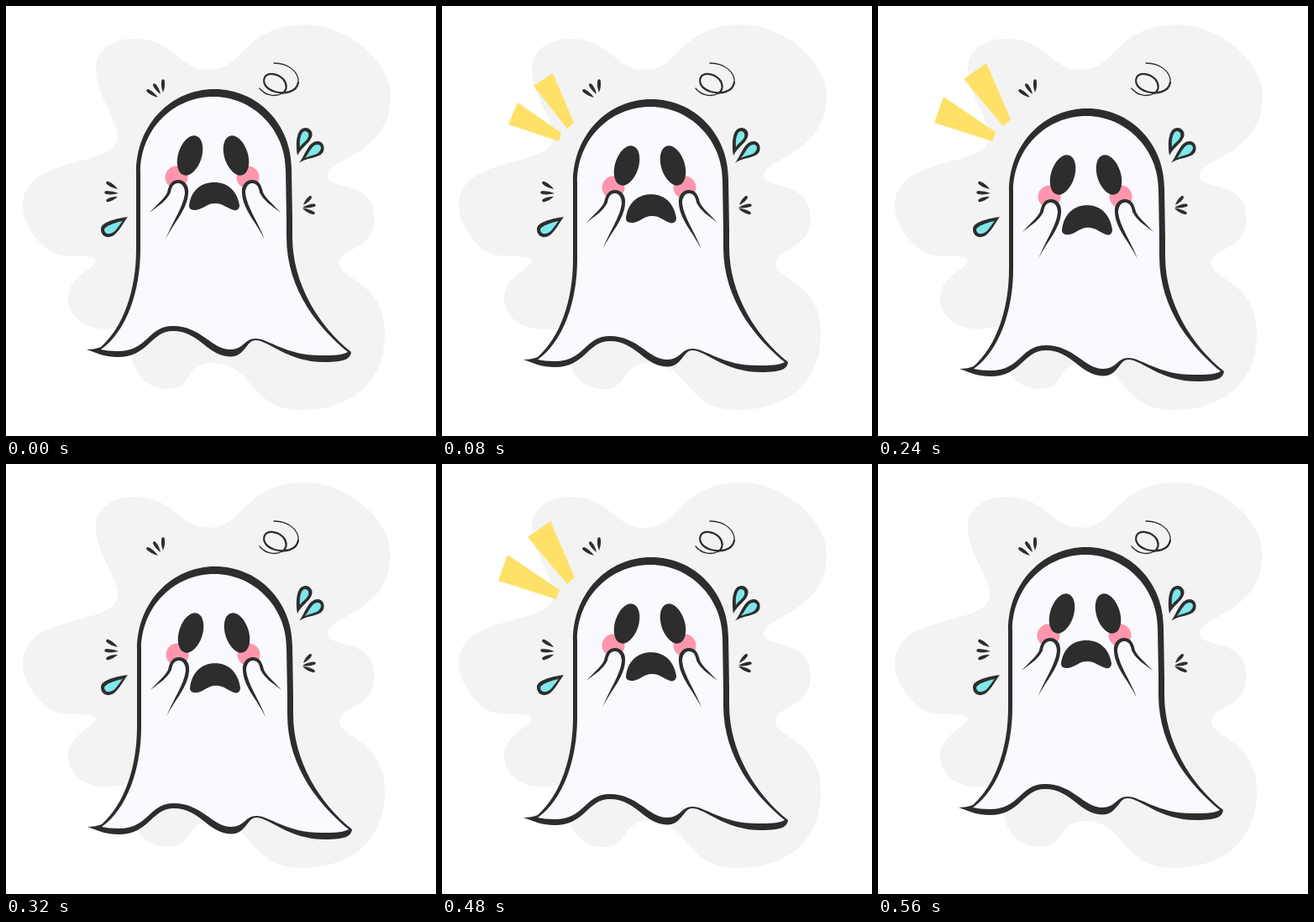
Write an HTML page with a canvas that moves like this. It is 512 px wide and 512 px high and loops after 640 ms.

```html
<!DOCTYPE html>
<html lang="en">
<head>
<meta charset="utf-8">
<title>Scared ghost</title>
<style>
html, body { margin: 0; width: 100%; height: 100%; overflow: hidden; background: #fff; }
canvas { display: block; width: 100vw; height: 100vh; }
</style>
</head>
<body>
<canvas id="stage" width="512" height="512"></canvas>
<script>
const ctx = document.getElementById('stage').getContext('2d');
const INK = '#2d2d2d', SHEET = '#f9faff', PINK = '#ff96ad', AQUA = '#7fe7ea', YELLOW = '#ffe168', GREY = '#f3f3f3';
const STEP = 80, LOOP = 640;

const blob = new Path2D(`M107 74 C107 52 128 39 153 39 C200 39 206 76 241 76
  C285 76 282 22 357 22 C401 22 458 62 458 108 C458 175 383 182 383 202
  C383 220 439 206 439 253 C439 290 397 288 397 307 C397 325 451 329 451 389
  C451 455 405 481 350 481 C290 481 295 425 246 425 C214 425 222 456 193 456
  C165 456 148 435 148 400 L150 380 L128 384 C95 388 74 370 74 347
  C74 322 107 312 107 303 C107 295 75 300 62 296 C44 292 20 262 20 238
  C20 175 133 195 133 155 C133 135 107 106 107 74Z`);

const outline = new Path2D(`M96 409 C103 409 108 408 113 406 C140 382 155 338 155 290
  V198 C155 141 197 99 248 99 C300 99 340 141 340 194 L341 255 V275 C341 330 372 381 411 412
  C410 420 404 424 379 424 C335 424 313 398 297 398 C286 398 285 417.5 267 417.5
  C240 417 230 387 199 387 C172 387 170 418 133 418 C118 418 110 414 96 409Z`);
const sheet = new Path2D(`M113 409 C143 388 160 340 160 290 V198 C160 147 199 108 247 108
  C294 108 333 147 333 196 L334 255 V275 C334 340 375 386 407 412 C400 416 390 416 375 416
  C332 416 313 396 297 396 C284 396 283 409 267 409 C245 409 232 381 199 381
  C168 381 170 411 133 411 C125 411 118 410 113 409Z`);

const handShape = new Path2D(`M171 246 C180 236 188 230 192 222 C194 212 198 207 205 207
  C213 207 218 214 217 223 C216 242 201 256 190 278Z`);
const handLine = new Path2D(`M171 246 C180 236 188 230 192 222 C194 212 198 207 205 207
  C213 207 218 214 217 223 C216 242 201 256 190 278
  C198 257 211 240 213 223 C213 216 210 211 205 211
  C199 211 197 216 196 222 C191 232 183 237 171 246Z`);
const mouth = new Path2D(`M218 238 C220 220 232 210 248 210 C264 210 275 220 278 237
  C278 242 275 244 271 243 C262 240 258 235 249 235 C239 235 235 242 226 243
  C220 243 218 241 218 238Z`);

const drops = [
  ['M145 251 C134 253 113 256 113 266 C113 273 119 276 123 275 C132 274 137 262 145 251Z',
   'M139 256 C130 258 117 262 117 267 C118 271 121 272 124 271 C130 270 133 263 139 256Z'],
  ['M347 178 C345 165 345 146 356 145 C363 145 366 151 364 156 C361 164 352 168 347 178Z',
   'M350 168 C349 160 351 149 356 149 C360 149 361 153 360 156 C357 162 353 163 350 168Z'],
  ['M349 187 C356 178 360 161 371 161 C377 161 380 167 378 173 C374 182 360 179 349 187Z',
   'M356 181 C362 174 364 165 371 165 C375 165 376 169 374 172 C371 178 364 177 356 181Z']
].map(pair => pair.map(d => new Path2D(d)));

const swirlEnds = new Path2D('M319 68 C338 68 349 80 348 91 M329 104 C320 109 308 106 302 98');
const swirlLoop = new Path2D(`M348 91 C346 103 332 105 320 102 C310 99 305 92 308 85
  C312 78 324 81 330 87 C335 93 335 100 329 104`);

// blunt end first, then the thin tip
const ticks = [
  [168, 100, 181, 109], [176, 93, 184, 105], [187, 88, 187, 103],
  [120, 210, 133, 218], [118, 222, 134, 223], [120, 232, 133, 227],
  [363, 227, 354, 237], [368, 237, 353, 240], [367, 247, 353, 241]
];

const burstSmall = new Path2D('M109 95 L132 80 L157 139 L149 146Z M79 141 L90 115 L142 151 L139 161Z');
const burstFull = new Path2D('M102 87 L129 68 L158 135 L149 143Z M67 139 L78 108 L140 150 L136 161Z');

function fill(path, color) {
  ctx.fillStyle = color;
  ctx.fill(path);
}

function stroke(path, width) {
  ctx.strokeStyle = INK;
  ctx.lineWidth = width;
  ctx.lineCap = 'round';
  ctx.stroke(path);
}

function oval(x, y, rx, ry, turn, color) {
  ctx.beginPath();
  ctx.ellipse(x, y, rx, ry, turn, 0, Math.PI * 2);
  ctx.fillStyle = color;
  ctx.fill();
}

function tick(x, y, tipX, tipY) {
  const len = Math.hypot(tipX - x, tipY - y);
  ctx.save();
  ctx.translate(x, y);
  ctx.rotate(Math.atan2(tipY - y, tipX - x));
  ctx.beginPath();
  ctx.moveTo(len, 0);
  ctx.quadraticCurveTo(len * 0.5, 3, 0.5, 1.7);
  ctx.quadraticCurveTo(-2, 0, 0.5, -1.7);
  ctx.quadraticCurveTo(len * 0.5, -3, len, 0);
  ctx.fillStyle = INK;
  ctx.fill();
  ctx.restore();
}

function hand() {
  fill(handShape, SHEET);
  fill(handLine, INK);
}

function ghost(dy) {
  ctx.save();
  ctx.translate(Math.min(1, dy), dy);
  fill(outline, INK);
  fill(sheet, SHEET);
  oval(203, 204, 13.5, 13.5, 0, PINK);
  oval(288, 204, 13.5, 13.5, 0, PINK);
  oval(219, 178, 14, 24.5, 0.31, INK);
  oval(274, 178, 14, 24.5, -0.31, INK);

  hand();
  ctx.save();
  ctx.translate(498, 0);
  ctx.scale(-1, 1);
  hand();
  ctx.restore();

  // the mouth drops and opens a little more as the ghost sinks
  ctx.translate(0, 145);
  ctx.scale(1, 1 + dy * 0.0028);
  ctx.translate(0, -145);
  fill(mouth, INK);
  ctx.restore();
}

function draw(time) {
  const step = Math.floor((time % LOOP) / STEP);
  const fromTop = (step - 3.5) / 3.5;
  const dy = Math.round(23.8 * (1 - fromTop * fromTop));

  ctx.fillStyle = '#fff';
  ctx.fillRect(0, 0, 512, 512);
  fill(blob, GREY);
  ghost(dy);

  for (const [shell, water] of drops) {
    fill(shell, INK);
    fill(water, AQUA);
  }
  ticks.forEach(t => tick(...t));
  stroke(swirlEnds, 1.3);
  stroke(swirlLoop, 2.2);

  const beat = step % 4;
  if (beat === 1) fill(burstSmall, YELLOW);
  else if (beat > 1 && step < 7) fill(burstFull, YELLOW);
}

function animate() {
  draw(performance.now());
  requestAnimationFrame(animate);
}
animate();
</script>
</body>
</html>
```
